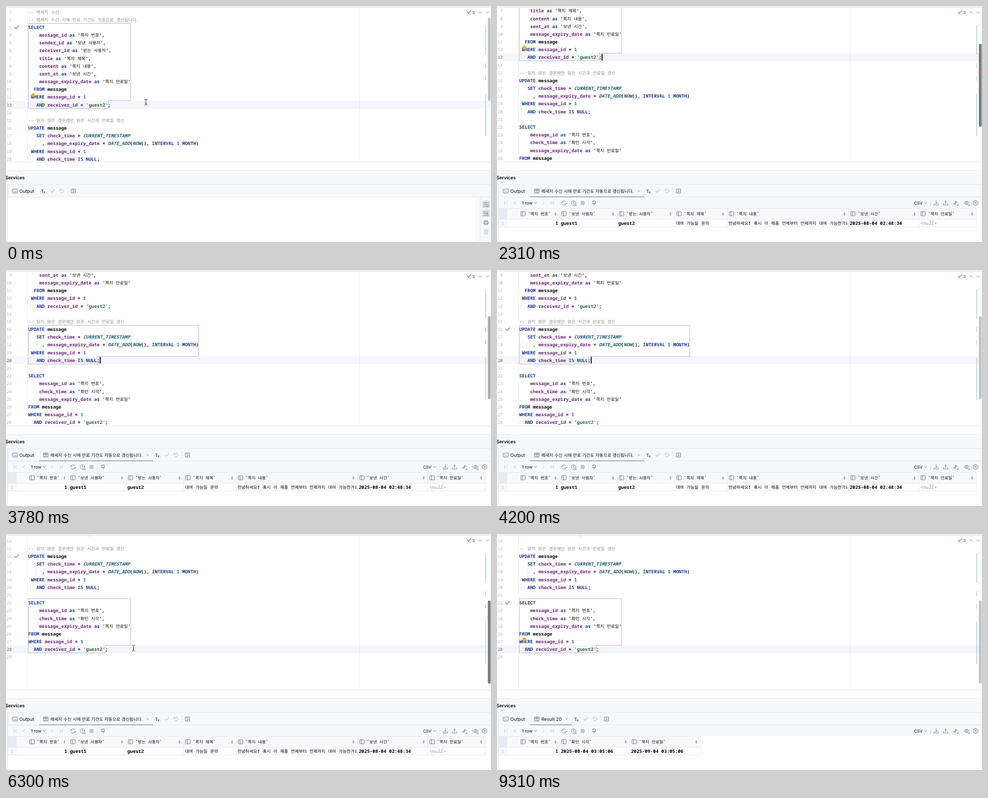
Write an HTML page with a canvas that moves like this. It is 1071x523 px and loops after 9.38 s.

```html
<!DOCTYPE html>
<html lang="ko">
<head>
<meta charset="utf-8">
<style>
html, body { margin: 0; width: 100%; height: 100%; overflow: hidden; background: #fff; }
canvas { display: block; }
</style>
</head>
<body>
<canvas id="stage" width="1071" height="523"></canvas>
<script>
const ctx = document.getElementById('stage').getContext('2d');
ctx.textRendering = 'geometricPrecision';

const LOOP = 9380, STEP = 70;
const MONO = '"Noto Sans Mono", monospace', UI = 'Inter, sans-serif';
const HANGUL = '"Noto Sans CJK KR", "Noto Sans CJK JP", sans-serif';
const SIZE = 10.14, CH = 6.084, LEFT = 49, LINE = 17.17;
const INK = '#080808', GREY = '#6c707e', PALE = '#b9bcc6', PANEL = '#f7f8fa', RULE = '#e6e7ec';

const SQL = `-- 메세지 수신
-- 메세지 수신 시에 만료 기간도 자동으로 갱신됩니다.
SELECT
    message_id as '쪽지 번호',
    sender_id as '보낸 사용자',
    receiver_id as '받는 사용자',
    title as '쪽지 제목',
    content as '쪽지 내용',
    sent_at as '보낸 시간',
    message_expiry_date as '쪽지 만료일'
  FROM message
 WHERE message_id = 1
   AND receiver_id = 'guest2';

-- 읽지 않은 경우에만 읽은 시간과 만료일 갱신
UPDATE message
   SET check_time = CURRENT_TIMESTAMP
     , message_expiry_date = DATE_ADD(NOW(), INTERVAL 1 MONTH)
 WHERE message_id = 1
   AND check_time IS NULL;

SELECT
    message_id as '쪽지 번호',
    check_time as '확인 시각',
    message_expiry_date as '쪽지 만료일'
FROM message
WHERE message_id = 1
  AND receiver_id = 'guest2';
`.split('\n');

// Column: [left, right, title, value]
const MESSAGE = {
  title: '메세지 수신 시에 만료 기간도 자동으로 갱신됩니다.', end: 325,
  cols: [
    [23, 138, '쪽지 번호', '1'], [138, 265, '보낸 사용자', 'guest1'],
    [265, 392, '받는 사용자', 'guest2'], [392, 508, '쪽지 제목', '대여 가능일 문의'],
    [508, 776, '쪽지 내용', '안녕하세요! 혹시 이 제품 언제부터 언제까지 대여 가능한가요?'],
    [776, 931, '보낸 시간', '2025-08-04 02:48:34'], [931, 1058, '쪽지 만료일', '<null>']
  ]
};
const CHECKED = {
  title: 'Result 20', end: 166,
  cols: [
    [23, 138, '쪽지 번호', '1'], [138, 293, '확인 시각', '2025-08-04 03:05:06'],
    [293, 449, '쪽지 만료일', '2025-09-04 03:05:06']
  ]
};

// Icon paths, centred on 0,0
const ICON = {
  check: 'M-4.5 0L-1.5 3L4.5 -3.5',
  terminal: 'M-4 -4.5H4Q5.5 -4.5 5.5 -3V3Q5.5 4.5 4 4.5H-4Q-5.5 4.5 -5.5 3V-3Q-5.5 -4.5 -4 -4.5ZM-3 -2L-1 0L-3 2M0 2H3',
  table: 'M-5 -4.5H5V4.5H-5ZM-5 -1.5H5M-1.7 -4.5V4.5M1.7 -4.5V4.5',
  layout: 'M-4.5 -4.5H4.5V4.5H-4.5ZM-.8 -4.5V4.5M-.8 0H4.5',
  column: 'M-4 -4.5H4Q5 -4.5 5 -3.5V3.5Q5 4.5 4 4.5H-4Q-5 4.5 -5 3.5V-3.5Q-5 -4.5 -4 -4.5ZM-1.5 -4.5V4.5',
  undo: 'M-4.5 -4.5V-1.5H-1.5M-4.2 -1.7A4.3 4.3 0 1 1 -3.6 2.6',
  refresh: 'M-5 -1A5 4.5 0 0 1 4.5 -2M5 1A5 4.5 0 0 1 -4.5 2M-6.5 -2.5L-5 -.5L-3 -2M6.5 2.5L5 .5L3 2',
  clock: 'M5 0A5 5 0 1 1 -5 0A5 5 0 1 1 5 0M0 -3V.5L2.3 1.8M3 6H6V3',
  close: 'M-2.5 -2.5L2.5 2.5M2.5 -2.5L-2.5 2.5',
  left: 'M1.5 -3.5L-2 0L1.5 3.5', right: 'M-1.5 -3.5L2 0L-1.5 3.5',
  first: 'M3.5 -3.5L0 0L3.5 3.5M-3 -3.5V3.5', last: 'M-3.5 -3.5L0 0L-3.5 3.5M3 -3.5V3.5',
  down: 'M-3 -1.5L0 1.5L3 -1.5', up: 'M-3 1.5L0 -1.5L3 1.5',
  pin: 'M-2.5 -4.5H2.5V-.5L3.8 1H-3.8L-2.5 -.5ZM0 1V5',
  save: 'M0 -5V1.5M-2.7 -1L0 1.7L2.7 -1M-4.7 1.5V4.5H4.7V1.5',
  load: 'M0 2V-4.5M-2.7 -2L0 -4.7L2.7 -2M-4.7 1.5V4.5H4.7V1.5',
  compare: 'M-5.5 1.5H.5M-1.8 -.8L.5 1.5L-1.8 3.8M5 -2H0M2 -4.5L-.3 -2L2 .5M3 6H6V3',
  eye: 'M-6 0Q0 -8 6 0Q0 8 -6 0ZM2 0A2 2 0 1 1 -2 0A2 2 0 1 1 2 0M3.5 6H6V3.5',
  gear: 'M-1.5 -5.2H1.5L2.2 -3.6L4 -3.8L5.3 -1.4L4.2 0L5.3 1.4L4 3.8L2.2 3.6L1.5 5.2H-1.5L-2.2 3.6L-4 3.8L-5.3 1.4L-4.2 0L-5.3 -1.4L-4 -3.8L-2.2 -3.6ZM1.7 0A1.7 1.7 0 1 1 -1.7 0A1.7 1.7 0 1 1 1.7 0',
  wrap: 'M-5.5 -4H5.5M-5.5 0H3.5A2 2 0 0 1 3.5 4H.5M2 2.5L.5 4L2 5.5M-5.5 4H-2',
  toEnd: 'M-5.5 -3.5H0M-5.5 0H0M-5.5 4H5.5M3 -4.5V1.5M1 -.5L3 1.6L5 -.5',
  print: 'M-3 -2V-4.5H3V-2M-3 2.5H-5V-2H5V2.5H3M-3 1H3V4.5H-3Z',
  trash: 'M-5 -3H5M-2 -3V-4.8H2V-3M-3.8 -3L-3.3 4.8H3.3L3.8 -3M-1.2 -1V3M1.2 -1V3',
  beam: 'M-3 -6.5Q0 -6.5 0 -4.5Q0 -6.5 3 -6.5M0 -4.5V4.5M-3 6.5Q0 6.5 0 4.5Q0 6.5 3 6.5M-1.5 2H1.5'
};

function rect(x, y, w, h, color, radius = 0) {
  ctx.fillStyle = color;
  ctx.beginPath();
  ctx.roundRect(x, y, w, h, radius);
  ctx.fill();
}

function icon(name, x, y, color = GREY, width = 1) {
  ctx.save();
  ctx.translate(x, y);
  ctx.strokeStyle = color;
  ctx.lineWidth = width;
  ctx.lineJoin = ctx.lineCap = 'round';
  ctx.stroke(new Path2D(ICON[name]));
  ctx.restore();
}

// Draws mixed Latin and Hangul text around the middle line y; returns the end x
function text(s, x, y, color = INK, family = MONO, size = SIZE, style = family === MONO ? '600' : '') {
  ctx.fillStyle = color;
  for (const run of s.match(/[가-힣]+|[^가-힣]+/g) || []) {
    ctx.font = /[가-힣]/.test(run) ? `500 ${size * .939}px ${HANGUL}` : `${style} ${size}px ${family}`;
    ctx.fillText(run, x, y + 3.6);
    x += ctx.measureText(run).width;
  }
  return x;
}

function style(word) {
  if (/^--/.test(word)) return ['#8c8c8c', '400'];
  if (/^'\w/.test(word)) return ['#2a6b35'];
  if (/^(CURRENT_TIMESTAMP|DATE_ADD|NOW)$/.test(word)) return ['#1f5d70', 'italic 600'];
  if (/^([A-Z]+|as)$/.test(word)) return ['#1c3a8a'];
  if (/^\d/.test(word)) return ['#2f55cc'];
  if (/_|^(title|content)$/.test(word)) return ['#69257a'];
  return [INK];
}

function code(s, y) {
  let x = LEFT;
  for (const word of s.match(/--.*|'[^']*'|\w+|\s+|./g) || []) {
    const [color, font] = style(word);
    x = text(word, x, y, color, MONO, SIZE, font);
  }
}

function wave(x, end, y, color = '#c4c4c4') {
  ctx.beginPath();
  for (let i = 0; x <= end; x += 1.5, i++) ctx.lineTo(x, y + i % 2 * 1.5);
  ctx.strokeStyle = color;
  ctx.lineWidth = .8;
  ctx.stroke();
}

const clamp = v => Math.max(0, Math.min(1, v));
const easeOut = (t, from, to, power) => 1 - (1 - clamp((t - from) / (to - from))) ** power;
const within = (t, ...spans) => spans.some(([a, b]) => t >= a && t < b);

const scrollAt = t => 139 * easeOut(t, 2030, 3010, 4.2) + 82 * easeOut(t, 4760, 5670, 2.83);

function caretOn(t) {
  if (t < 3710) return within(t, [210, 1540], [2100, 2590], [3080, 3360]);
  return Math.floor((t - 3710) / 496) % 2 === 0;
}

function statementFrame(first, last, right, mid) {
  const top = mid(first) - LINE / 2, bottom = mid(last) + LINE / 2, step = bottom - LINE;
  const end = LEFT + (SQL[last - 1].length - 1) * CH;
  ctx.beginPath();
  for (const [x, y] of [[LEFT, top], [right, top], [right, step], [end, step], [end, bottom], [LEFT, bottom]])
    ctx.lineTo(Math.floor(x) + .5, Math.floor(y - .5) + .5);
  ctx.closePath();
  ctx.strokeStyle = '#b3addd';
  ctx.lineWidth = 1;
  ctx.stroke();
}

function editor(t) {
  const scroll = scrollAt(t);
  const mid = n => 13 + LINE * (n - 1) - scroll;
  const current = t < 3080 ? 13 : t < 5810 ? 20 : 28;

  ctx.save();
  ctx.beginPath();
  ctx.rect(0, 3, 1071, 342);
  ctx.clip();
  rect(0, Math.round(mid(current) - LINE / 2 - .5), 1071, 17, '#f5f6f9');
  rect(47, 3, 1, 342, '#e9eaee');
  rect(780, 3, 1, 342, '#e9eaee');
  for (const [n, x] of [[13, 53], [18, 66], [20, 53]]) rect(x, mid(n) - LINE / 2, 1, LINE, '#e3e4e9');

  SQL.forEach((line, i) => {
    const n = i + 1, y = mid(n);
    if (y < -10 || y > 360) return;
    text(String(n), n < 10 ? 7 : 1.5, y, n === current ? '#5a5d6b' : '#aeb3c2', MONO, 9.3, '');
    code(line, y);
  });
  wave(203, 289, mid(2) + 5);
  wave(115, 149, mid(15) + 5);

  if (t < 3710) statementFrame(3, 13, 275, mid);
  else if (t < 6300) statementFrame(16, 20, 425, mid);
  else statementFrame(22, 28, 275, mid);

  const done = t < 4060 ? 3 : t < 7070 ? 16 : t < 7210 ? 0 : 22;
  if (done) icon('check', 23.5, mid(done), '#4b9f62', 1.6);

  if (within(t, [0, 350], [1820, 3080], [7980, LOOP])) {
    const y = mid(current - 1) - 4.2;
    rect(56, y - 4.5, 8.4, 8.4, '#f4a92b', 4.2);
    rect(58.5, y + 3.5, 3.5, 1.6, '#b98a3c');
  }
  if (caretOn(t)) rect(Math.round(LEFT + SQL[current - 1].length * CH - .5), mid(current) - 7.5, 2, 14.5, '#000');

  icon('check', 1022.5, 13, '#4b9f62', 1.2);
  wave(1017.5, 1026.5, 17.5, '#4b9f62');
  text('3', 1029.5, 14, '#555', UI, 9.5);
  icon('up', 1047, 14);
  icon('down', 1063, 14);
  for (const [a, b] of [[43, 108], [127, 137], [156, 165], [194, 288]]) rect(1058.3, a, 2, b - a, '#b9d5e3');

  const fade = t < 2100 ? 0 : t < 4830 ? 1 - clamp((t - 3640) / 200) : 1 - clamp((t - 6650) / 200);
  const shade = 196 - 72 * fade;
  rect(1064, 26 + scroll * .55, 6.3, 184, `rgb(${shade},${shade},${shade})`, 3);
  ctx.restore();

  rect(0, 0, 1071, 3, '#f0f1f4');
  rect(0, 3, 1071, 1, '#e9eaee');
  rect(0, 345, 1071, 1, '#e4e5ea');
}

function pointer(t) {
  let x = 281.5, y = 197;
  if (t < 350) [x, y] = [309, 213];
  else if (within(t, [3080, 3710])) y = 200;
  else if (within(t, [4830, 6720])) y += 56 * clamp((t - 5600) / 210);
  else return;
  icon('beam', x, y, '#fff', 2.4);
  icon('beam', x, y, '#222', 1);
}

function tabs(result, end) {
  rect(0, 364, 1071, 60, PANEL);
  rect(0, 364, 1071, 1, RULE);
  rect(0, 395, 1071, 1, RULE);
  rect(0, 423, 1071, 1, RULE);
  rect(0, 424, 4, 99, PANEL);
  rect(3, 396, 1, 127, RULE);
  text('Services', -1.5, 380.5, INK, UI, SIZE, '600');
  icon('terminal', 19.5, 410);
  text('Output', 29.5, 410, INK, UI);
  if (result) {
    icon('table', 88, 410);
    text(result.title, 98, 410, INK, UI);
    if (end === result.end) icon('close', end - 12, 410, '#9a9daa', .9);
    rect(73, 422, end - 73, 1.5, '#8791ab');
  }
  text('T', end + 4.5, 410, '#333', UI, 9.5, '500');
  text('x.', end + 9.5, 411, '#333', UI, 8, '500');
  icon('check', end + 30, 410, PALE, 1.2);
  icon('undo', end + 50.5, 410, PALE);
  rect(end + 63, 402, 1, 16, '#dcdde3');
  icon('layout', end + 76, 410);
}

function emptyOutput() {
  rect(1036, 424, 35, 99, PANEL);
  rect(1047, 424, 1, 99, RULE);
  rect(1051.5, 431, 17, 17, '#dfe1e6', 3);
  rect(1051.5, 451, 17, 17, '#dfe1e6', 3);
  icon('wrap', 1060, 440);
  icon('toEnd', 1060, 460);
  icon('print', 1060, 480);
  icon('trash', 1060, 500.5, PALE);
}

function toolbar() {
  rect(4, 424, 1067, 24, PANEL);
  [['first', 20], ['left', 40], ['right', 102], ['last', 122]].forEach(([n, x]) => icon(n, x, 436.5, PALE));
  text('1 row', 55, 436.5, INK, UI, 9.5);
  text('CSV', 921, 436.5, INK, UI, 9);
  [['down', 85], ['refresh', 148], ['clock', 169], ['pin', 214.5], ['down', 946], ['save', 970],
    ['load', 990.5], ['compare', 1012], ['eye', 1037], ['gear', 1057]].forEach(([n, x]) => icon(n, x, 436.5));
  rect(184.5, 432, 9, 9, '#c3c5cd', 1.5);
  rect(201, 429, 1, 15, '#dcdde3');
  rect(957, 429, 1, 15, '#dcdde3');
}

function grid({ cols }) {
  const right = cols[cols.length - 1][1];
  rect(4, 448, right - 4, 24, PANEL);
  rect(4, 448, 19, 24, '#e9eaef');
  rect(4, 472, 19, 18, PANEL);
  for (const y of [448, 472, 489]) rect(4, y, right - 3, 1, RULE);
  text('1', 10, 481, '#aeb3c2', MONO, 9.5, '');
  cols.forEach(([a, b, title, value], i) => {
    const x = i ? a + 10 : 57.5;
    icon('column', x, 460.5);
    text('`' + title + '`', x + 10.5, 460.5, INK, MONO, 9.7);
    ctx.fillStyle = GREY;
    ctx.fill(new Path2D(`M${b - 11} 459.8h4.4l-2.2 -2.6zM${b - 11} 461.5h4.4l-2.2 2.6z`));
    rect(b, 448, 1, 42, RULE);
    ctx.save();
    ctx.beginPath();
    ctx.rect(a, 472, b - a - 2, 17);
    ctx.clip();
    const empty = value === '<null>';
    text(value, i ? a + 3 : b - 9, 481, empty ? '#8c8c8c' : '#000', MONO, SIZE, empty ? 'italic' : '600');
    ctx.restore();
  });
}

function spinner(t) {
  const head = Math.floor(t / 140);
  ctx.lineCap = 'round';
  ctx.lineWidth = 2.6;
  for (let i = 0; i < 8; i++) {
    const a = i * Math.PI / 4, level = ((i - head) % 8 + 8) % 8;
    ctx.strokeStyle = `rgba(110,112,120,${.25 + level * .07})`;
    ctx.beginPath();
    ctx.moveTo(538 + 5.5 * Math.cos(a), 515.5 + 5.5 * Math.sin(a));
    ctx.lineTo(538 + 9.5 * Math.cos(a), 515.5 + 9.5 * Math.sin(a));
    ctx.stroke();
  }
}

function draw(t) {
  rect(0, 0, 1071, 523, '#fff');
  editor(t);
  const result = t < 910 ? null : t < 7070 ? MESSAGE : CHECKED;
  const closable = !within(t, [910, 980], [7070, 7560]);
  tabs(result, result ? result.end - (closable ? 0 : 13) : 73);
  if (result) {
    toolbar();
    grid(result);
  } else emptyOutput();
  if (within(t, [980, 1470], [7070, 7630])) spinner(t);
  pointer(t);
}

const start = performance.now();
function tick() {
  const t = (performance.now() - start) % LOOP;
  draw(t - t % STEP);
  requestAnimationFrame(tick);
}
tick();
</script>
</body>
</html>
```
